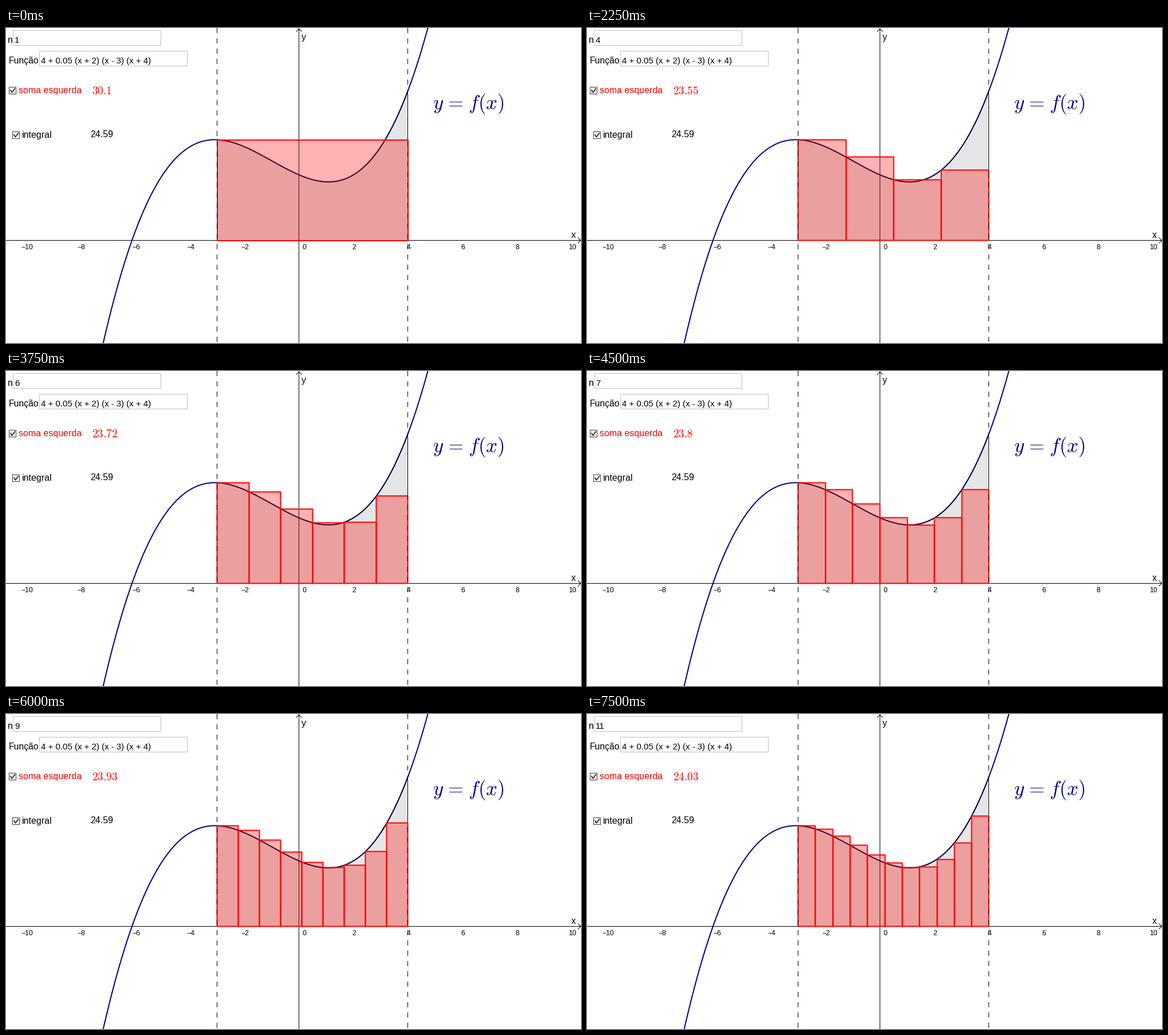
Animation, 1004 px wide and 551 px high, one loop 8000 ms. Source, as a matplotlib script:

```python
import numpy as np
import matplotlib.pyplot as plt
from matplotlib.animation import FuncAnimation
from matplotlib.collections import PolyCollection
from matplotlib.patches import Polygon, Rectangle

WIDTH, HEIGHT, DPI = 1004, 551, 64
PT = 72 / DPI                      # points per pixel
ORIGIN_X, ORIGIN_Y = 511.5, 371.5
UNIT_X, UNIT_Y = 47.6, 40.95
A, B = -3, 4
NAVY = "#00008b"
INTERVAL, FRAMES, HOLD = 250, 32, 3

plt.rcParams["font.family"] = "Liberation Sans"
plt.rcParams["mathtext.fontset"] = "cm"
plt.rcParams["path.snap"] = False

fig = plt.figure(figsize=(WIDTH / DPI, HEIGHT / DPI), dpi=DPI, facecolor="white")
ax = fig.add_axes([0, 0, 1, 1])
ax.set_xlim(0, WIDTH)
ax.set_ylim(HEIGHT, 0)
ax.axis("off")


def f(x):
    return 4 + 0.05 * (x + 2) * (x - 3) * (x + 4)


def px(x):
    return ORIGIN_X + UNIT_X * x


def py(y):
    return ORIGIN_Y - UNIT_Y * y


def centre(v):
    """Move a coordinate to the centre of its pixel."""
    return np.floor(v + 1e-6) + 0.5


def line(xs, ys, color="black", width=1, z=2, **style):
    return ax.plot(xs, ys, color=color, lw=width * PT, zorder=z, **style)[0]


def label(x, y, text, size=16, color="black", **style):
    return ax.text(x, y, text, fontsize=size * PT, color=color,
                   va="baseline", zorder=6, **style)


def number(value):
    return f"{value:.2f}".rstrip("0").rstrip(".")


def input_box(x, y):
    ax.add_patch(Rectangle((x + 0.5, y + 0.5), 258, 26, fc="white",
                           ec="#c0c0c0", lw=PT, zorder=5))


def checkbox(x, y):
    ax.add_patch(Rectangle((x + 0.5, y + 0.5), 12, 12, fc="white",
                           ec="#40363f", lw=PT, zorder=5))
    line([x + 3, x + 5.5, x + 10.3], [y + 6, y + 9.7, y + 3.2], "#40363f", 2, 6)


def draw_axes():
    line([0, WIDTH], [ORIGIN_Y] * 2)
    line([ORIGIN_X] * 2, [1, HEIGHT])
    line([999, 1003.5, 999], [367, ORIGIN_Y, 376])
    line([507, ORIGIN_X, 516], [6, 1.5, 6])
    for tick in range(-10, 11, 2):
        x = 520.5 if tick == 0 else px(tick) + 1
        label(x, 387, str(tick).replace("-", "\u2212"), 12.3, ha="center")
    label(986.5, 367, "x")
    label(515.5, 20.5, "y")


def draw_function():
    x = np.linspace(-7.5, 5, 500)
    line(px(x), py(f(x)), NAVY, 2, 2.5)
    x = np.linspace(A, B, 300)
    edges = centre(px(A)), centre(px(B))
    area = np.column_stack([np.clip(px(x), *edges), py(f(x))])
    area = np.vstack([[edges[0], ORIGIN_Y], area, [edges[1], ORIGIN_Y]])
    ax.add_patch(Polygon(area, fc=(0, 0, 0, 0.1), ec="black", lw=PT, zorder=3))
    for edge in edges:
        line([edge] * 2, [0, HEIGHT], z=5, dashes=(9, 9), dash_capstyle="butt")
    label(745, 142, r"$y\hspace{0.09}=\hspace{0.09}f(x)$", 35, NAVY)


def draw_controls():
    input_box(12, 4)
    input_box(58, 40)
    checkbox(5, 103)
    checkbox(11, 181)
    label(3, 26, "n")
    label(5, 62, "Função", 15.7)
    label(61, 62, "4 + 0.05 (x + 2) (x - 3) (x + 4)", 15)
    label(22, 114, "soma esquerda", color="red")
    label(28, 192, "integral")
    label(147, 191, "24.59")


draw_axes()
draw_function()
draw_controls()

bars = PolyCollection([], facecolors=[(1, 0, 0, 0.3)], edgecolors=["red"],
                      linewidths=[2 * PT], zorder=4)
ax.add_collection(bars, autolim=False)
count_text = label(15, 26, "", 15.2)
sum_text = label(150, 116.5, "", 19.3, "red")


def update(frame):
    n = frame // HOLD + 1
    step = (B - A) / n
    x = A + step * np.arange(n + 1)
    heights = f(x[:-1])
    sides, tops = centre(px(x)), centre(py(heights))
    bars.set_verts([
        [(left, ORIGIN_Y), (left, top), (right, top), (right, ORIGIN_Y)]
        for left, right, top in zip(sides, sides[1:], tops)
    ])
    count_text.set_text(str(n))
    sum_text.set_text(f"${number(step * heights.sum())}$")
    return bars, count_text, sum_text


anim = FuncAnimation(fig, update, frames=FRAMES, interval=INTERVAL,
                     repeat=True, repeat_delay=0)
plt.show()
```
